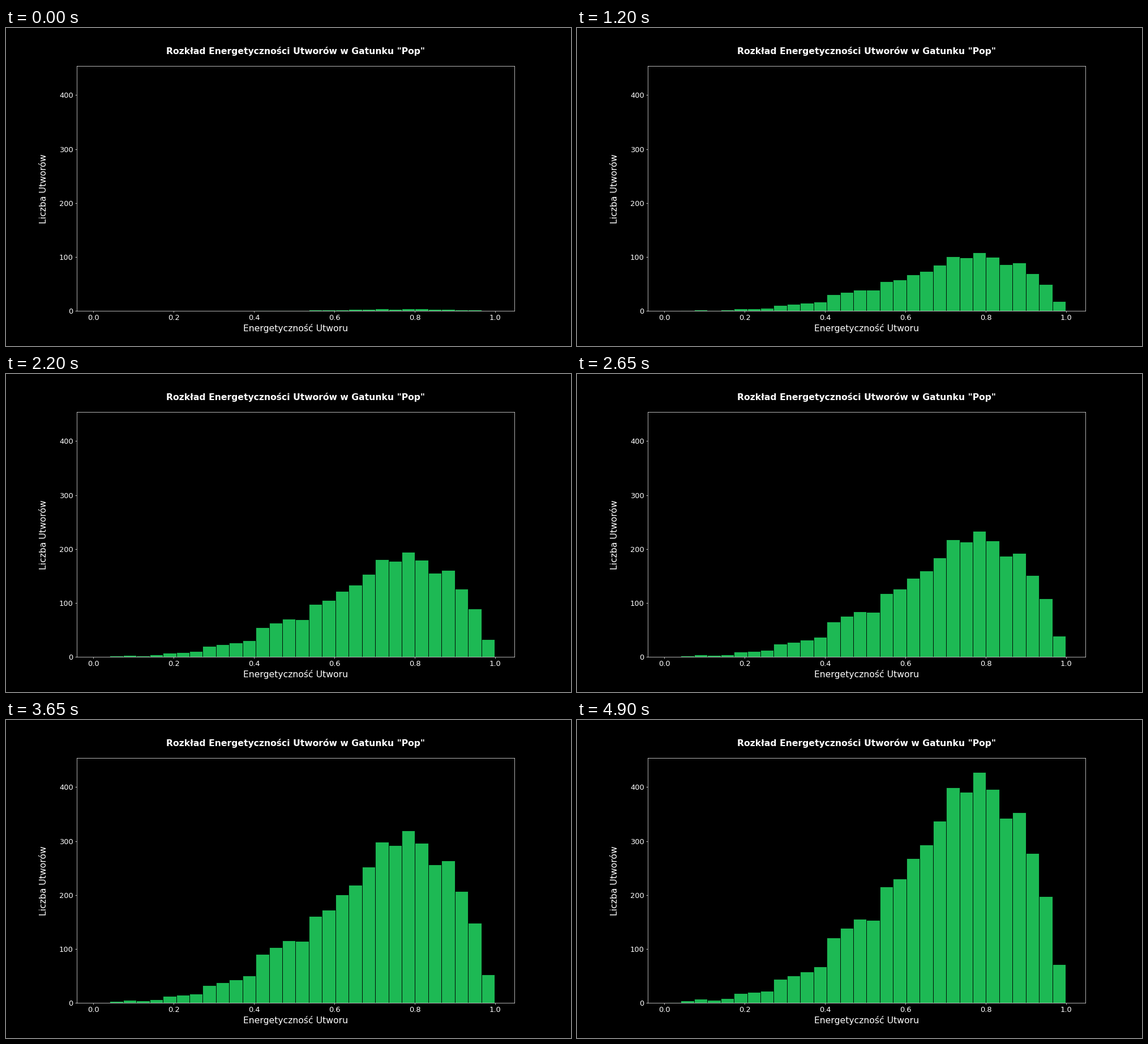
These frames come from a looping animation (998x561 px, 10000 ms). A matplotlib script:

```python
import numpy as np
import matplotlib.pyplot as plt
from matplotlib.animation import FuncAnimation

W, H, DPI = 998, 561, 62.375
INTERVAL, FRAMES = 50, 200
LAST_STEP, STEPS = 98, 100

GREEN = "#1DB954"
COUNTS = np.array([
    1, 5, 8, 6, 9, 18, 20, 23, 45, 51,
    59, 68, 122, 140, 157, 155, 218, 233, 271, 296,
    341, 403, 395, 432, 400, 346, 357, 280, 200, 72,
])

plt.style.use("dark_background")
plt.rcParams["font.family"] = "DejaVu Sans"

# The tiny margin keeps the height from truncating below a whole pixel.
fig, ax = plt.subplots(figsize=(W / DPI, (H + 1e-6) / DPI), dpi=DPI)
fig.patch.set_facecolor("black")
ax.set_facecolor("black")

edges = np.linspace(0.0081, 0.9988, len(COUNTS) + 1)
bars = ax.bar(edges[:-1], COUNTS, width=np.diff(edges), align="edge",
              color=GREEN, edgecolor="black", linewidth=1)

margin = 0.05 * (edges[-1] - edges[0])
ax.set_xlim(edges[0] - margin, edges[-1] + margin)
ax.set_ylim(0, COUNTS.max() * 1.05)
ax.set_xticks(np.arange(0, 1.1, 0.2))
ax.set_yticks(range(0, 401, 100))
ax.tick_params(labelsize=15)

ax.set_title('Rozkład Energetyczności Utworów w Gatunku "Pop"',
             fontsize=18, fontweight="bold", pad=25)
ax.set_xlabel("Energetyczność Utworu", fontsize=18)
ax.set_ylabel("Liczba Utworów", fontsize=18, labelpad=23)


def update(frame):
    share = (min(frame, LAST_STEP) + 1) / STEPS
    for bar, count in zip(bars, COUNTS):
        bar.set_height(count * share)
    return list(bars)


anim = FuncAnimation(fig, update, frames=FRAMES, init_func=lambda: update(0),
                     interval=INTERVAL, repeat=True, repeat_delay=0)
plt.show()
```
